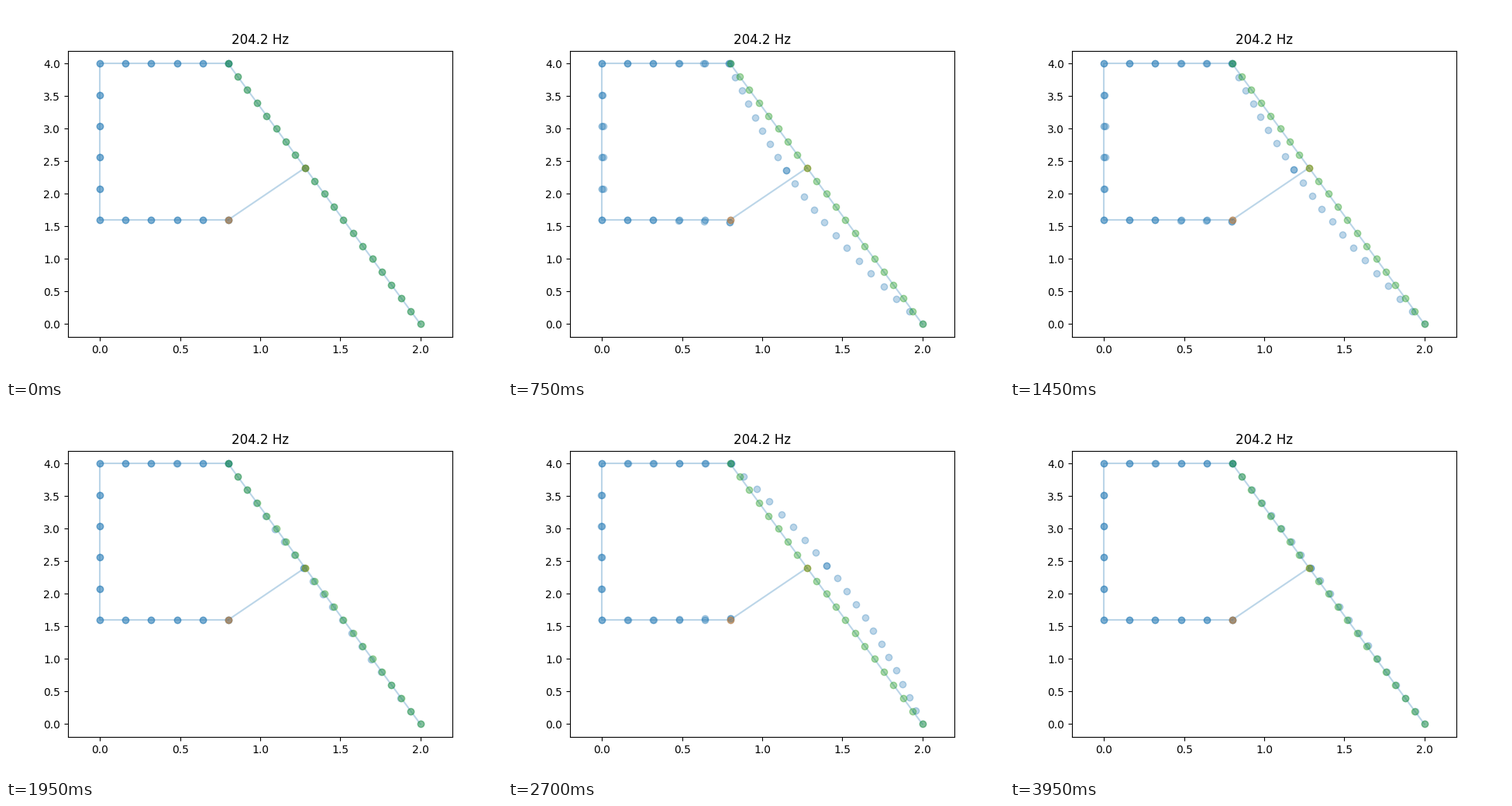
Recreate the animation shown at these times as a matplotlib script. Size 640 by 480 pixels, loop 4000 ms.

```python
import numpy as np
import matplotlib.pyplot as plt
from matplotlib.animation import FuncAnimation

FRAMES = 80
INTERVAL = 50


def segment(a, b, n):
    """n evenly spaced points from a to b."""
    return np.linspace(a, b, n)


# Structure at rest: a three-sided frame, a tie rod and a slanted bar
top = segment((0.8, 4), (0, 4), 6)
side = segment((0, 4), (0, 1.6), 6)
base = segment((0, 1.6), (0.8, 1.6), 6)
frame = np.vstack([top, side[1:], base[1:]])
rod = np.array([(0.8, 1.6), (1.28, 2.4)])
bar = segment((0.8, 4), (2, 0), 21)


def top_mode(p):
    return np.column_stack([-0.0092 * p[:, 0] / 0.8, 0 * p[:, 0]])


def side_mode(p):
    u = (p[:, 1] - 1.6) / 2.4
    return np.column_stack([0.0126 * np.sin(np.pi * u) * (1.25 - 0.5 * u), 0 * u])


def base_mode(p):
    u = p[:, 0] / 0.8
    return np.column_stack([-0.0044 * u, -0.0405 * u ** 1.8])


def bar_mode(p):
    u = (4 - p[:, 1]) / 4
    bend = 0.1795 * np.sin(np.pi * u)
    return np.column_stack([-bend - 0.0092 * (1 - u), -0.3 * bend])


frame_shift = np.vstack([top_mode(top), side_mode(side)[1:], base_mode(base)[1:]])
bar_shift = bar_mode(bar)
rod_shift = np.vstack([frame_shift[-1], bar_shift[8]])

parts = [
    (frame, frame_shift, "C0"),
    (rod, rod_shift, "C1"),
    (bar, bar_shift, "C2"),
]

fig, ax = plt.subplots(figsize=(6.4, 4.8), dpi=100)
ax.set_xlim(-0.2, 2.2)
ax.set_ylim(-0.2, 4.2)
ax.set_title("204.2 Hz")

for rest, _, _ in parts:
    ax.plot(*rest.T, color="C0", alpha=0.3)
dots = [ax.plot(*rest.T, "o", color="C0", alpha=0.3)[0] for rest, _, _ in parts]
for rest, _, color in parts:
    ax.plot(*rest.T, "o", color=color, alpha=0.4)


def update(k):
    # Linear sweep out, across and back
    amp = np.interp(k, [0, FRAMES / 4, 3 * FRAMES / 4, FRAMES], [0, 1, -1, 0])
    for dot, (rest, shift, _) in zip(dots, parts):
        dot.set_data(*(rest + amp * shift).T)
    return dots


anim = FuncAnimation(fig, update, frames=FRAMES, interval=INTERVAL,
                     repeat=True, repeat_delay=0)
plt.show()
```
